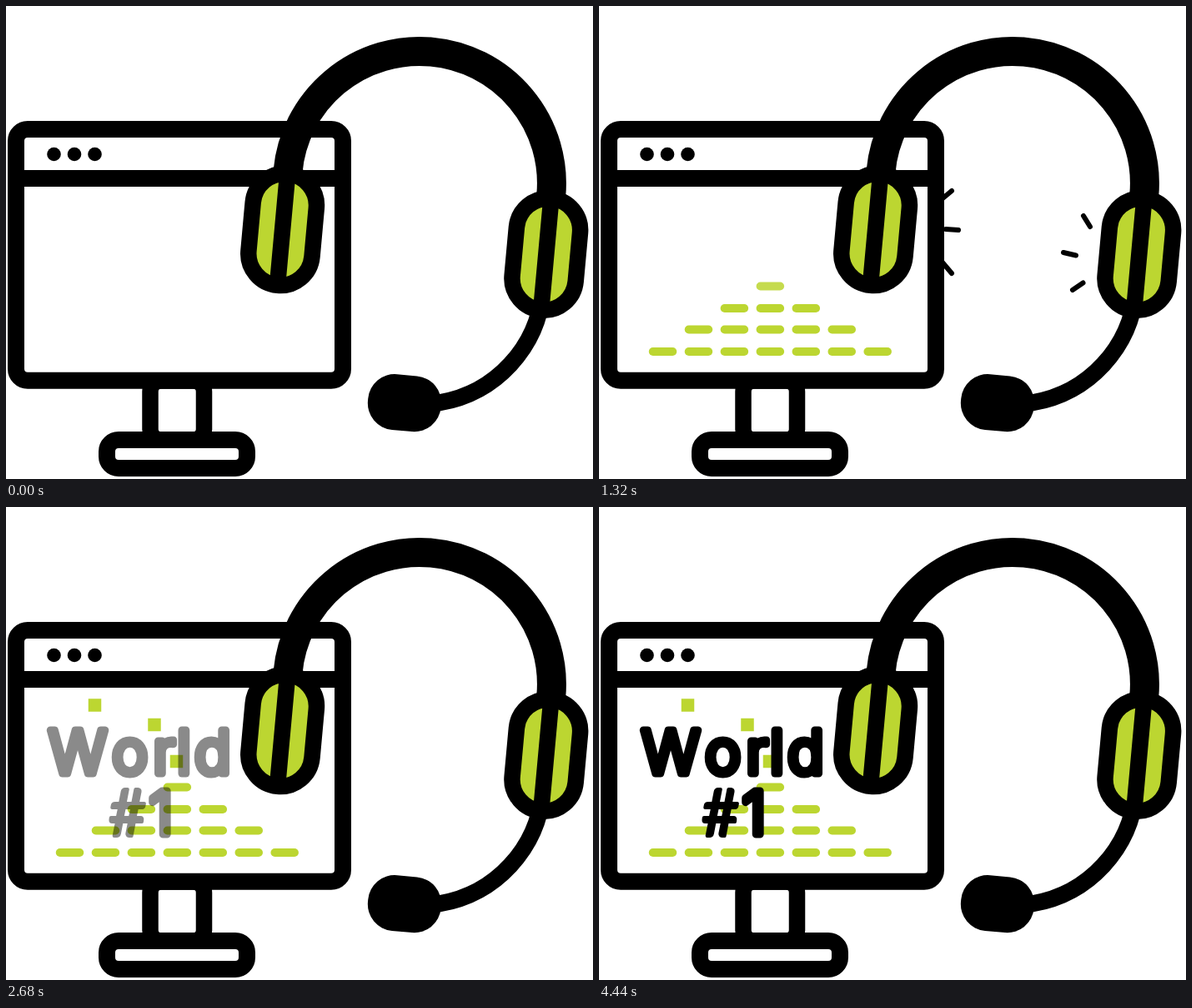
An HTML page for the animation above (4480 ms loop, 704 px wide and 568 px high).

```html
<!DOCTYPE html>
<html lang="en">
<head>
<meta charset="utf-8">
<title>Headset and monitor</title>
<style>
  html, body { margin: 0; width: 100%; height: 100%; overflow: hidden; background: #fff; }
  svg { display: block; }
  .line { fill: none; stroke: #000; stroke-width: 20; }
  .cup { fill: #bcd631; stroke: #000; stroke-width: 19.5; }
  .ray { fill: none; stroke: #000; stroke-width: 6; stroke-linecap: round; }
  .lime { fill: #bcd631; }
  text { font: 300 72px Inter, sans-serif; text-anchor: middle;
         stroke: #000; stroke-width: 9; stroke-linejoin: round; }
  .hash { font: 400 77px Lato, sans-serif; stroke-width: 4; }
</style>
</head>
<body>
<svg width="704" height="568" viewBox="0 0 704 568">
  <g class="line">
    <rect x="12" y="148" width="392" height="301.7" rx="14"/>
    <path d="M12 207H404"/>
    <rect x="173" y="450" width="64.5" height="71" rx="13" stroke-width="19.5"/>
    <rect x="121" y="521" width="168" height="34" rx="14"/>
  </g>
  <circle cx="57.5" cy="178" r="8.3"/>
  <circle cx="82" cy="178" r="8.3"/>
  <circle cx="106.5" cy="178" r="8.3"/>

  <g id="bars" class="lime"></g>
  <g id="squares" class="lime"></g>
  <g id="label">
    <text x="86 148.5 189.5 213.5 248" y="319.5">World</text>
    <text><tspan class="hash" x="145.5" y="395">#</tspan><tspan x="186" y="392.5">1</tspan></text>
  </g>

  <g transform="rotate(5.2 497 212)">
    <path class="line" style="stroke-width:35" d="M337.5 232V213A158.5 158.5 0 0 1 654.5 213V232"/>
    <path class="line" d="M655 329A149 149 0 0 1 544.6 472.9L525 478"/>
    <rect x="458" y="443.8" width="88" height="67" rx="32"/>
    <g class="cup">
      <rect x="299.2" y="215.8" width="76.4" height="134.6" rx="38.2"/>
      <rect x="616.8" y="216.8" width="76.4" height="134.6" rx="38.2"/>
      <path d="M337.4 220V345M655 220V345"/>
    </g>
  </g>

  <g id="left" class="ray"><path d="M411 232L423 222M416 268L431 269M412 308L423 321"/></g>
  <g id="right" class="ray"><path d="M581 252L589 265M557 296L572 299.5M568 341L580.5 332.5"/></g>
</svg>
<script>
const LOOP = 4480, STEP = 40;
const get = id => document.getElementById(id);
const ramp = (t, start, length) => Math.min(1, Math.max(0, (t - start) / length));

function addRect(parent, cx, cy, w, h, rx) {
  const r = document.createElementNS("http://www.w3.org/2000/svg", "rect");
  const attrs = { x: cx - w / 2, y: cy - h / 2, width: w, height: h, rx };
  for (const k in attrs) r.setAttribute(k, attrs[k]);
  parent.append(r);
  return r;
}

// Pyramid of dashes: each row loses one dash at both ends
const rows = [415, 388.5, 363, 336.5].map((y, row) => {
  const g = document.createElementNS("http://www.w3.org/2000/svg", "g");
  get("bars").append(g);
  for (let col = row; col < 7 - row; col++) addRect(g, 76.5 + 42.95 * col, y, 33.5, 10, 5);
  return g;
});

const squares = [[204.5, 305.5], [178, 261.5], [106.5, 238]]
  .map(([x, y]) => addRect(get("squares"), x, y, 15.5, 15.5, 0));

function scaleAbout(el, cx, cy, s) {
  el.setAttribute("transform", `translate(${cx} ${cy}) scale(${s}) translate(${-cx} ${-cy})`);
  el.style.display = s > 0 ? "" : "none";
}

function draw(now) {
  const t = Math.floor(now % LOOP / STEP) * STEP;
  rows.forEach((g, i) => g.style.opacity = ramp(t, 360 + 240 * i, 280));
  squares.forEach((s, i) => s.style.opacity = ramp(t, 1400 + 240 * i, 280));
  get("label").style.opacity = ramp(t, 2480, 440);

  const size = ramp(t, 560, 600) * (1 - ramp(t, 1720, 600));
  scaleAbout(get("left"), 378, 273, size);
  scaleAbout(get("right"), 626, 307.5, size);
}

const begin = performance.now();
(function frame() {
  draw(performance.now() - begin);
  requestAnimationFrame(frame);
})();
</script>
</body>
</html>
```
